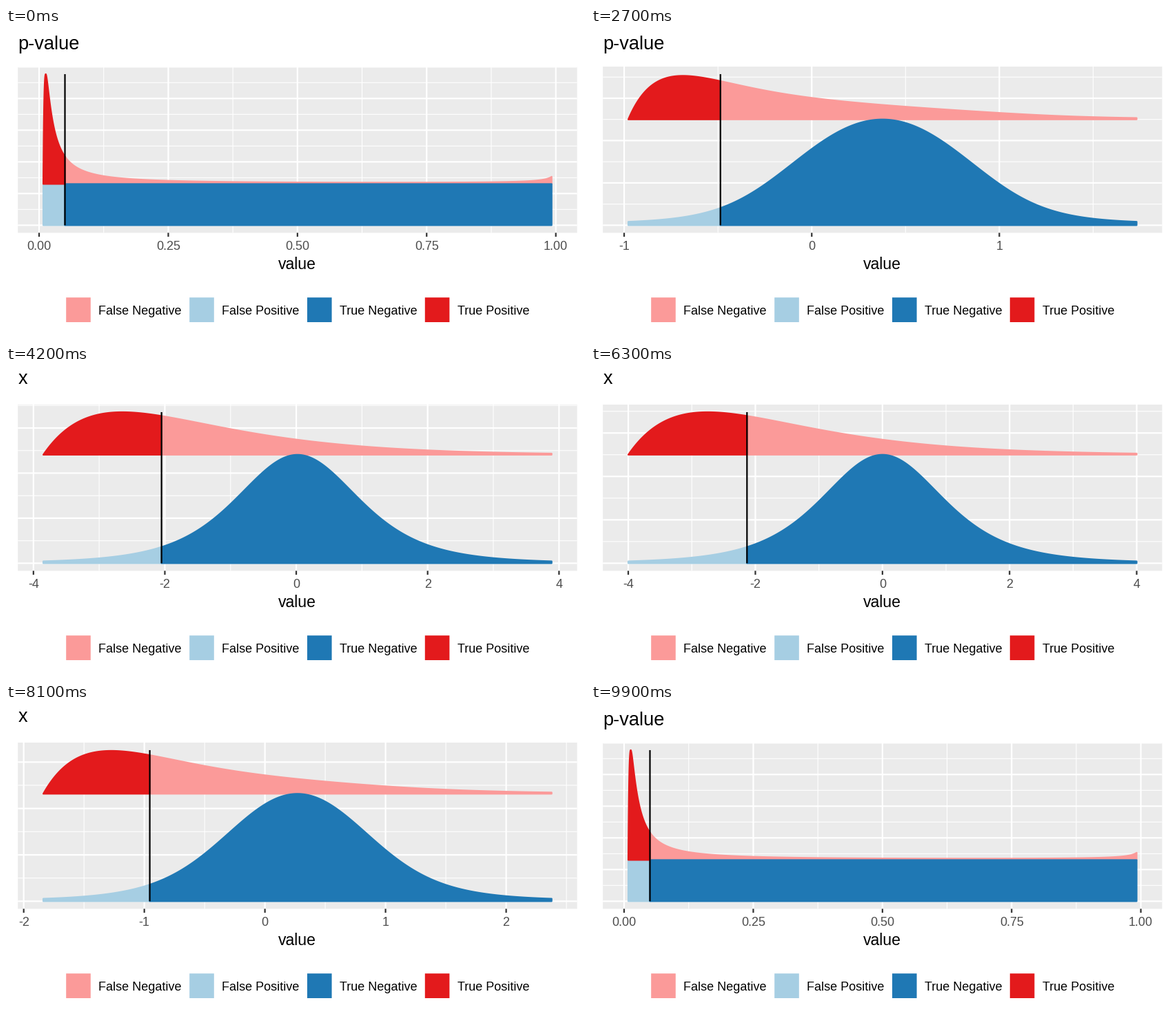
Write a matplotlib script that moves like this. It is 840 by 450 pixels and loops after 10000 ms.

```python
import math

import matplotlib.pyplot as plt
import numpy as np
from matplotlib.animation import FuncAnimation
from matplotlib.collections import LineCollection
from matplotlib.patches import Polygon, Rectangle

W, H, DPI = 840, 450, 100
FRAMES, INTERVAL = 100, 100
LEFT, RIGHT, TOP, BOTTOM = 17.2, 828.5, 56.0, 297.3
PT = 72 / DPI  # points per pixel
THICK, THIN = 2.22 * PT, 1.11 * PT
PINK, SKY, BLUE, RED = "#FB9A99", "#A6CEE3", "#1F78B4", "#E31A1C"

plt.rcParams["font.family"] = "Liberation Sans"


# --- the two distributions, as test statistic and as p-value ---

def t4_pdf(x):
    return 0.375 * (1 + x * x / 4) ** -2.5


def t4_cdf(x):
    s = 1 + x * x / 4
    return 0.5 + 0.375 * x / np.sqrt(s) * (1 - x * x / s / 12)


CUT_X, CUT_P = -2.1318, 0.05
N = 512
grid = np.linspace(-4, 4, N)
cut = int(np.searchsorted(grid, CUT_X))
grid = np.insert(grid, cut, CUT_X)
pval = t4_cdf(grid)

null_pdf = t4_pdf(grid)
alt_pdf = 0.64 * (grid + 4) * np.exp(-0.8 * (grid + 4))
ratio = alt_pdf / null_pdf

null_x = 200 / 3 * null_pdf
alt_x = 100 / 3 * alt_pdf
null_p = np.full_like(grid, 200 / 3 / N)
alt_p = 100 / 3 * ratio / ratio.sum()


def mix(a, b, e):
    return (1 - e) * a + e * b


# --- timing ---

def cubic(t):
    return 4 * t ** 3 if t < 0.5 else 1 - 4 * (1 - t) ** 3


def state(i):
    """Share of the x state, and the title."""
    if i <= 12:
        return 0.0, "p-value"
    if i <= 50:
        return cubic((i - 12) / 38), "p-value" if i <= 31 else "x"
    if i <= 62:
        return 1.0, "x"
    return 1 - cubic((i - 62) / 37), "x" if i <= 81 else "p-value"


# --- axis breaks (extended Wilkinson labelling) ---

NICE = (1, 5, 2, 2.5, 4, 3)


def breaks(lo, hi, m=5):
    span = hi - lo
    best, found = -9, None
    for rank, q in enumerate(NICE):
        for k in range(2, 12):
            z0 = math.ceil(math.log10(span / (k + 1) / q))
            for z in (z0, z0 + 1):
                step = q * 10.0 ** z
                first = math.floor(hi / step) - (k - 1)
                last = math.ceil(lo / step)
                for start in range(first, last + 1):
                    a = start * step
                    b = a + step * (k - 1)
                    simple = 1 - rank / 5 - 1 + (a <= 0 <= b)
                    cover = 1 - 0.5 * ((hi - b) ** 2 + (lo - a) ** 2) / (0.1 * span) ** 2
                    r = (k - 1) / (b - a)
                    rt = (m - 1) / (max(b, hi) - min(a, lo))
                    dense = 2 - max(r / rt, rt / r)
                    score = 0.25 * simple + 0.2 * cover + 0.5 * dense
                    if score > best + 1e-9:
                        best, found = score, (start, step, k)
    start, step, k = found
    major = step * (start + np.arange(k))
    minor = step * (start + np.arange(k + 1) - 0.5)

    def inside(v):
        return v[(v >= lo) & (v <= hi)]

    return inside(major), inside(minor)


def labels(values):
    digits = 0
    while digits < 4 and np.any(np.abs(np.round(values, digits) - values) > 1e-6):
        digits += 1
    return [f"{v + 0.0:.{digits}f}" for v in values]


# --- stage ---

fig = plt.figure(figsize=(W / DPI, H / DPI), dpi=DPI, facecolor="white")
ax = fig.add_axes([0, 0, 1, 1])
ax.set_xlim(0, W)
ax.set_ylim(H, 0)
ax.axis("off")


def box(x, y, w, h, color, z=0):
    ax.add_patch(Rectangle((x, y), w, h, fc=color, lw=0, snap=False, zorder=z))


def text(x, y, s, px, color="black", ha="left"):
    return ax.text(x, y, s, fontsize=px * PT, color=color, ha=ha, va="baseline")


def lines(color, width, z):
    c = LineCollection([], colors=color, linewidths=width, zorder=z,
                       capstyle="butt", snap=False)
    ax.add_collection(c, autolim=False)
    return c


def area(color, z):
    p = Polygon([(0, 0), (1, 0), (1, 1)], fc=color, ec=color, lw=THICK,
                joinstyle="round", snap=False, zorder=z)
    ax.add_patch(p)
    return p


box(LEFT, TOP, RIGHT - LEFT, BOTTOM - TOP, "#EBEBEB")
minor_grid = lines("white", THIN, 1)
major_grid = lines("white", THICK, 2)
ticks = lines("#333333", THICK, 2)
false_neg, false_pos = area(PINK, 3), area(SKY, 4)
true_neg, true_pos = area(BLUE, 5), area(RED, 6)
marker = lines("black", THICK, 7)

title = text(LEFT, 31.2, "", 27.2)
text((LEFT + RIGHT) / 2, 350, "value", 23, ha="center")
tick_text = [text(0, 322, "", 18, "#4D4D4D", "center") for _ in range(12)]

legend = ((87.2, PINK, "False Negative"), (266.2, SKY, "False Positive"),
          (437, BLUE, "True Negative"), (607.8, RED, "True Positive"))
for kx, color, name in legend:
    box(kx, 391.2, 35.6, 35.8, color)
    text(kx + 47.2, 416, name, 18)


def update(i):
    e, name = state(i)
    xs = mix(pval, grid, e)
    null, alt = mix(null_p, null_x, e), mix(alt_p, alt_x, e)
    base = mix(null_p.max(), 25, e)
    top = mix(null_p.max() + alt_p.max(), 25 + alt_x.max(), e)

    pad_x, pad_y = 0.05 * (xs[-1] - xs[0]), 0.05 * top
    x_lo, x_hi = xs[0] - pad_x, xs[-1] + pad_x
    y_lo, y_hi = -pad_y, top + pad_y

    def px(v):
        return LEFT + (v - x_lo) / (x_hi - x_lo) * (RIGHT - LEFT)

    def py(v):
        return BOTTOM - (v - y_lo) / (y_hi - y_lo) * (BOTTOM - TOP)

    def fill(shape, part, height, floor):
        x, y = px(xs[part]), py(height[part] + floor)
        ground = py(floor)
        shape.set_xy(np.vstack([np.column_stack([x, y]),
                                [(x[-1], ground), (x[0], ground)]]))

    below, above = slice(0, cut + 1), slice(cut, None)
    fill(true_pos, below, alt, base)
    fill(false_neg, above, alt, base)
    fill(false_pos, below, null, 0)
    fill(true_neg, above, null, 0)

    x_major, x_minor = breaks(x_lo, x_hi)
    y_major, y_minor = breaks(y_lo, y_hi)
    for group, bx, by in ((minor_grid, x_minor, y_minor), (major_grid, x_major, y_major)):
        group.set_segments([[(LEFT, py(v)), (RIGHT, py(v))] for v in by]
                           + [[(px(v), TOP), (px(v), BOTTOM)] for v in bx])
    ticks.set_segments([[(px(v), BOTTOM), (px(v), BOTTOM + 5.7)] for v in x_major])

    names = labels(x_major)
    for n, t in enumerate(tick_text):
        t.set_text(names[n] if n < len(names) else "")
        if n < len(names):
            t.set_x(px(x_major[n]))

    mx = px(mix(CUT_P, CUT_X, e))
    marker.set_segments([[(mx, py(top)), (mx, py(0))]])
    title.set_text(name)
    title.set_y(31.2 if name == "p-value" else 26)
    return []


anim = FuncAnimation(fig, update, frames=FRAMES, interval=INTERVAL,
                     init_func=lambda: [], repeat=True, repeat_delay=0)
plt.show()
```
